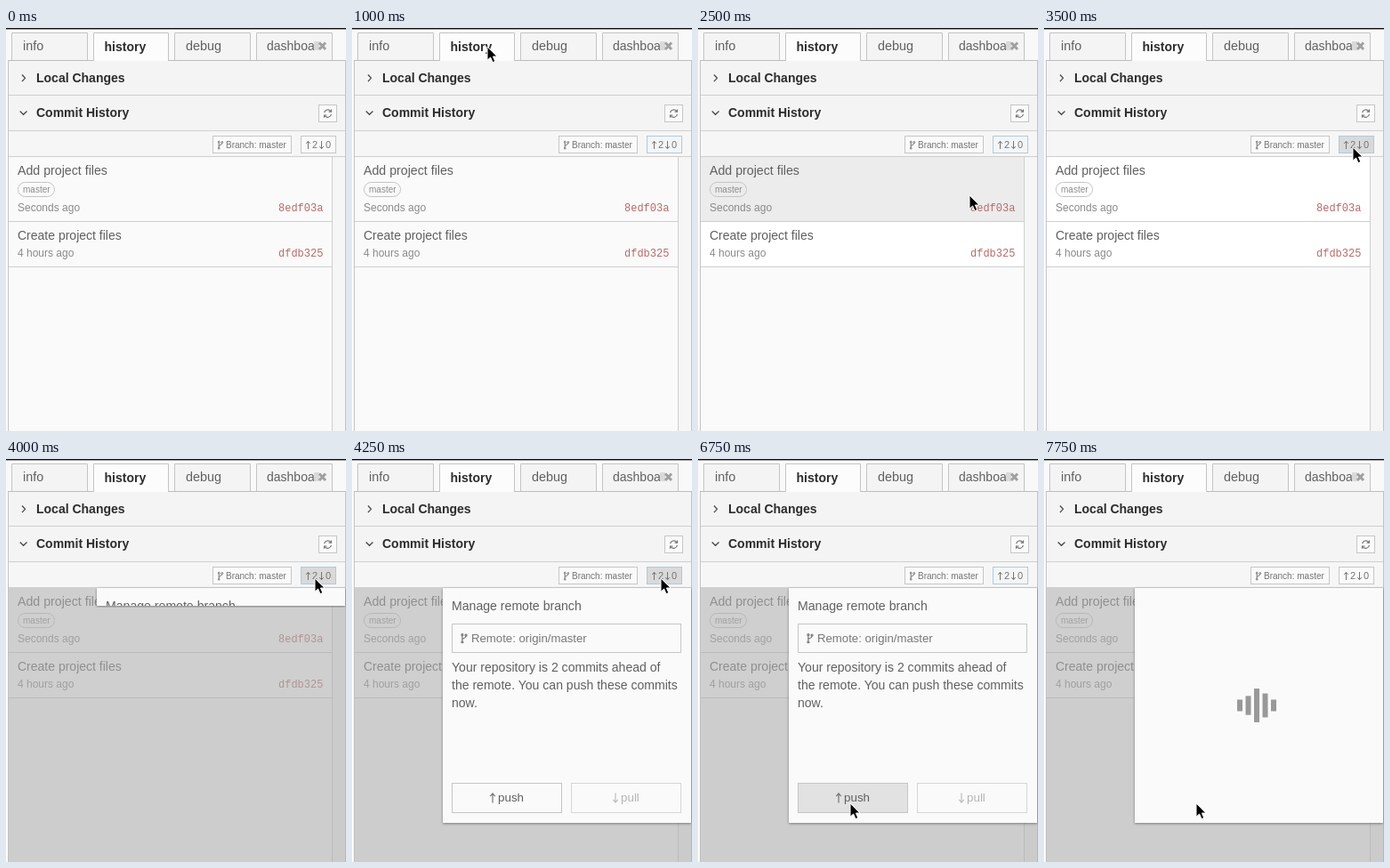
Animation of 382 by 453 pixels, one loop 8000 ms. Source, as an HTML page:

```html
<!DOCTYPE html>
<html lang="en">
<head>
<meta charset="utf-8">
<title>Commit history panel</title>
<style>
  html, body { margin: 0; width: 100%; height: 100%; overflow: hidden; background: #f6f6f6; }
  svg { display: block; width: 382px; height: 453px; }
  text { font-family: "Liberation Sans", Arial, sans-serif; font-size: 14px; fill: #606060; white-space: pre; }
  .b { font-weight: bold; fill: #2c2c2c; }
  .s { font-size: 12px; fill: #8a8a8a; }
  .xs { font-size: 10px; fill: #747474; }
  .hash { font: 12px "Liberation Mono", monospace; fill: #b76a6a; }
  .btn { fill: #fafafa; stroke: #c6c6c6; }
  .tab { fill: #f4f4f4; stroke: #c4c4c4; }
  .rule { stroke: #cfcfcf; }
  .ico { fill: none; stroke: #747474; }
</style>
</head>
<body>
<svg viewBox="0 0 382 453" xmlns="http://www.w3.org/2000/svg">
  <defs>
    <filter id="shadow" x="-10%" y="-10%" width="120%" height="120%">
      <feDropShadow dx="0" dy="1" stdDeviation="1.6" flood-color="#000" flood-opacity=".4"/>
    </filter>
    <clipPath id="tabClip"><rect x="282" y="6" width="64" height="30"/></clipPath>
    <clipPath id="panelClip"><rect id="clip" x="102" y="145" width="279" height="264"/></clipPath>
    <g id="up"><path class="ico" stroke="inherit" d="M0 4.5V-4M-2.3-1.6 0-4.2 2.3-1.6"/></g>
    <g id="fork" class="ico">
      <path d="M1.2-2.5V2.8M1.2 1.2C1.6-.4 4.6.4 4.8-2.2"/>
      <circle cx="1.2" cy="-3.4" r=".9"/><circle cx="1.2" cy="3.7" r=".9"/><circle cx="4.8" cy="-3" r=".9"/>
    </g>
  </defs>

  <rect width="382" height="453" fill="#f6f6f6"/>
  <rect width="2" height="453" fill="#fff"/>
  <rect y="1" width="382" height="36" fill="#f9f9f9"/>
  <rect width="382" height="1.4" fill="#111"/>

  <g id="tabs"></g>
  <path class="tab" d="M98.5 37V5.5H182.5V37" style="fill:#fcfcfc"/>
  <path d="M2 36.5H98M183 36.5H382" stroke="#bdbdbd"/>
  <text class="b" x="110.5" y="25.5">history</text>
  <text x="293" y="25" clip-path="url(#tabClip)">dashboard</text>
  <rect x="346" y="15" width="6" height="10" fill="#d9d9d9"/>
  <path d="M352 16.5 359 24M359 16.5 352 24" stroke="#a0a0a0" stroke-width="3"/>

  <path d="M2.5 37V453M381.5 37V453" stroke="#c2c2c2"/>
  <rect x="3" y="37" width="378" height="79" fill="#f4f4f4"/>
  <path class="rule" d="M3 75.5H381M3 115.5H381"/>
  <path d="M18 52.5 21.5 56.3 18 60" fill="none" stroke="#444" stroke-width="1.2"/>
  <path d="M15.7 93.5 19.6 97.3 23.5 93.5" fill="none" stroke="#444" stroke-width="1.2"/>
  <text class="b" x="34" y="61">Local Changes</text>
  <text class="b" x="34" y="100">Commit History</text>
  <rect class="btn" x="351.5" y="86.5" width="20" height="19"/>
  <path class="ico" stroke-width="1.2" d="M357.6 95.2A4 4 0 0 1 364.7 93.4M365.4 97A4 4 0 0 1 358.3 98.8M365.5 91.5V94.2H362.6M357.5 100.7V98H360.4"/>

  <rect class="btn" x="232.5" y="121.5" width="88" height="19"/>
  <use href="#fork" x="238" y="131.5"/>
  <text class="xs" x="247" y="135">Branch: master</text>
  <rect id="sync" class="btn" x="331.5" y="121.5" width="39" height="19"/>
  <use href="#up" x="339.5" y="131.5"/>
  <text class="xs" x="344" y="135.3" style="font-size:11px">2</text>
  <use href="#up" transform="translate(354.5 131.5) rotate(180)"/>
  <text class="xs" x="359" y="135.3" style="font-size:11px">0</text>

  <rect x="3" y="145" width="363" height="308" fill="#fafafa"/>
  <rect id="row1" x="3" y="145" width="363" height="72"/>
  <rect id="row2" x="3" y="218" width="363" height="50"/>
  <path class="rule" d="M3 144.5H381M3 217.5H366M3 268.5H366M366.5 145V453"/>
  <text x="13" y="165" style="font-size:14.2px">Add project files</text>
  <rect x="13.5" y="173.5" width="41" height="16" rx="8" fill="none" stroke="#c4c4c4"/>
  <text class="xs" x="19" y="185" style="fill:#8c8c8c">master</text>
  <text class="s" x="13" y="206">Seconds ago</text>
  <text class="hash" x="306" y="206">8edf03a</text>
  <text x="13" y="238">Create project files</text>
  <text class="s" x="13" y="257">4 hours ago</text>
  <text class="hash" x="306" y="257">dfdb325</text>

  <g id="popup">
    <rect x="3" y="145" width="379" height="308" fill="#afafaf" opacity=".6"/>
    <rect id="panel" x="102" y="145" width="279" height="264" fill="#fafafa" filter="url(#shadow)"/>
    <g id="form" clip-path="url(#panelClip)">
      <text x="112" y="170" style="font-size:14.1px">Manage remote branch</text>
      <rect id="remote" class="btn" x="112.5" y="185.5" width="257" height="32"/>
      <use href="#fork" transform="translate(122.5 201.5) scale(1.15)"/>
      <text x="134" y="206" style="font-size:13.2px;fill:#777">Remote: origin/master</text>
      <text y="239" style="font-size:14.05px">
        <tspan x="112">Your repository is 2 commits ahead of</tspan>
        <tspan x="112" dy="20">the remote. You can push these commits</tspan>
        <tspan x="112" dy="20">now.</tspan>
      </text>
      <rect id="push" class="btn" x="112.5" y="364.5" width="123" height="33"/>
      <use href="#up" transform="translate(158 381) scale(1.2)"/>
      <text x="164" y="385" style="font-size:13.4px">push</text>
      <rect class="btn" x="246.5" y="364.5" width="123" height="33" style="stroke:#d6d6d6"/>
      <g opacity=".45">
        <use href="#up" transform="translate(296 381) rotate(180) scale(1.2)"/>
        <text x="302" y="385" style="font-size:13.4px">pull</text>
      </g>
    </g>
    <g id="loader" fill="#999"></g>
  </g>

  <path id="cursor" d="M0 0V15.2L3.6 12 6 17.6 8.8 16.4 6.4 11H11Z" fill="#000" stroke="#fff" stroke-width="1"/>
</svg>
<script>
const LOOP = 8000, STEP = 250;
const $ = id => document.getElementById(id);
const within = (t, a, b) => t >= a && t < b;
const show = (el, on) => el.setAttribute('display', on ? 'inline' : 'none');

// Pointer stops: time, x, y
const stops = [
  [500, 190, 1], [750, 152, 21], [1250, 134, 71], [1500, 119, 160],
  [2000, 148, 226], [2250, 240, 240], [2500, 305, 188], [3000, 333, 144],
  [3250, 348, 135], [3500, 347, 134], [5000, 257, 192], [5250, 244, 198],
  [5750, 216, 246], [6500, 175, 365], [6750, 171, 387]
];

$('tabs').innerHTML = [['info', 6], ['debug', 189], ['', 281]].map(([label, x]) =>
  `<path class="tab" d="M${x + .5} 37V5.5H${x + 85.5}V37"/><text x="${x + 13}" y="25" style="font-size:14.4px">${label}</text>`
).join('');

const bars = Array.from({ length: 5 }, (_, i) => {
  const bar = document.createElementNS('http://www.w3.org/2000/svg', 'rect');
  bar.setAttribute('x', 217 + i * 9.5);
  bar.setAttribute('width', 6);
  return $('loader').appendChild(bar);
});

// A single crest travels across the bars
function drawLoader(t) {
  const crest = ((t - 7400) * .006 + 2) % 7 - 2;
  bars.forEach((bar, i) => {
    const h = 13 + 25 * Math.max(0, 1 - ((i - crest) / 1.35) ** 2);
    bar.setAttribute('y', 277 - h / 2);
    bar.setAttribute('height', h);
  });
}

function rowFill(t, hovered, visited) {
  return hovered ? '#ececec' : t >= visited ? '#fff' : '#fafafa';
}

function draw(time) {
  const t = Math.floor(time / STEP) * STEP;

  const stop = stops.filter(s => s[0] <= t).pop();
  show($('cursor'), stop);
  if (stop) $('cursor').setAttribute('transform', `translate(${stop[1]} ${stop[2]})`);

  const focus = within(t, 1000, 7250), over = within(t, 3250, 5000);
  $('sync').style.fill = over ? '#d9d9d9' : focus ? '#f3f5f7' : '';
  $('sync').style.stroke = focus ? '#b3c9da' : '';

  $('row1').style.fill = rowFill(t, within(t, 1500, 2250) || within(t, 2500, 3000), 2250);
  $('row2').style.fill = rowFill(t, within(t, 2250, 2500), 2500);

  show($('popup'), t >= 4000);
  const height = t < 4250 ? 20 : 264;
  $('panel').setAttribute('height', height);
  $('clip').setAttribute('height', height);
  $('remote').style.fill = within(t, 5000, 5750) ? '#e2e2e2' : '';
  $('push').style.fill = within(t, 6750, 7250) ? '#e2e2e2' : '';

  const loading = t >= 7250;
  show($('form'), !loading);
  show($('loader'), loading);
  if (loading) drawLoader(t);
}

const start = performance.now();
function tick() {
  draw((performance.now() - start) % LOOP);
  requestAnimationFrame(tick);
}
tick();
</script>
</body>
</html>
```
